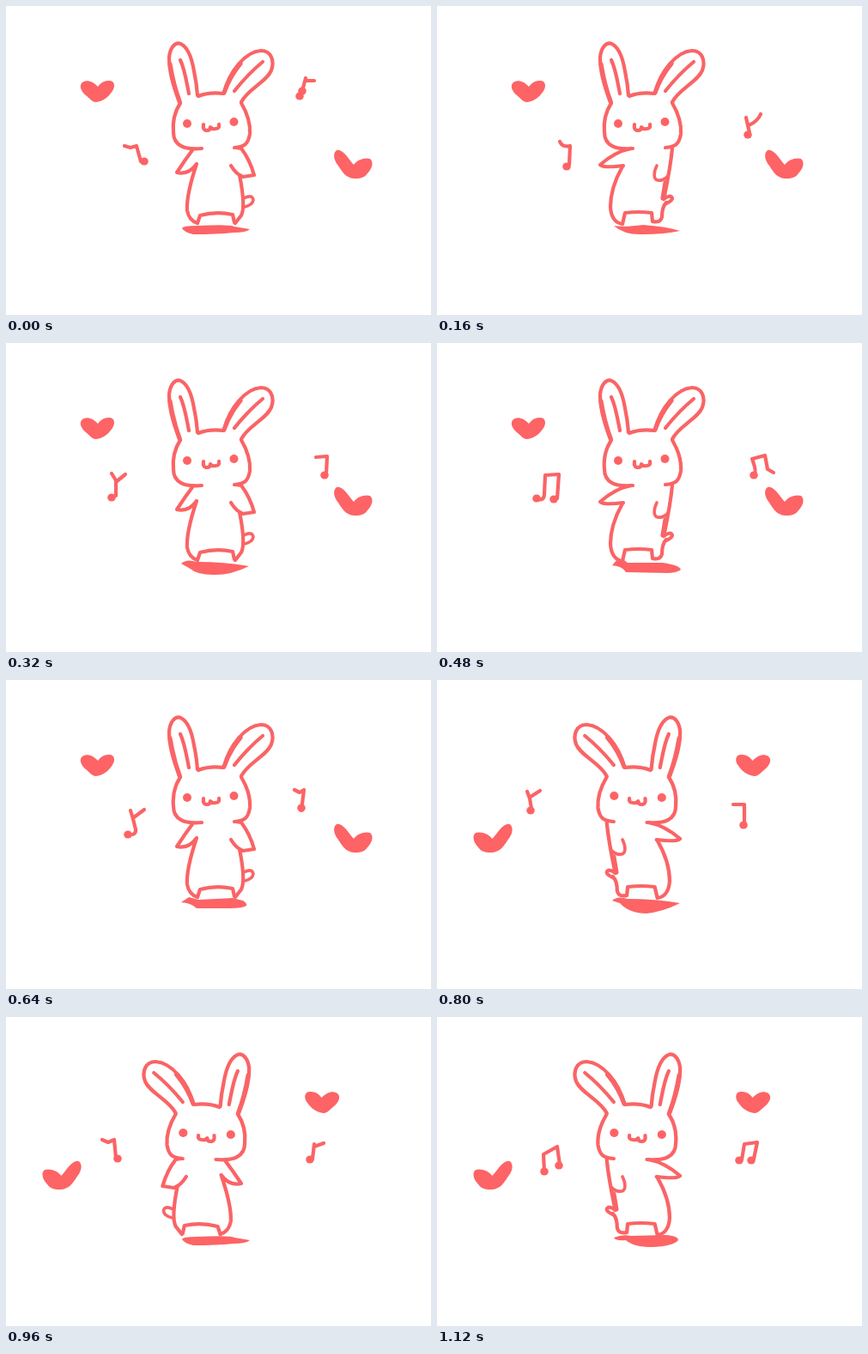
Write an HTML page that moves like this. It is 495x360 px and loops after 1.28 s.

```html
<!DOCTYPE html>
<html lang="en">
<head>
<meta charset="utf-8">
<title>Dancing rabbit</title>
<style>
  html, body { margin: 0; width: 100%; height: 100%; overflow: hidden; background: #fff; }
  svg { display: block; width: 495px; height: 360px; }
  .line { fill: none; stroke: #fa6466; stroke-width: 4.2; stroke-linecap: round; stroke-linejoin: round; }
  .thin { stroke-width: 3.6; }
  .bold { stroke-width: 5.2; }
  .fill { fill: #fe6365; stroke: none; }
</style>
</head>
<body>
<svg viewBox="0 0 495 360">
  <g id="dancer">
    <path class="fill" d="M104 112C99 111 97 107 93 104C88 100 85 94 88 90C92 85 101 87 107 94Q112 87 119 87C126 86 128 93 124 99C119 107 111 112 104 112Z"/>
    <path class="fill" d="M405 201C396 200 392 194 387 186C382 180 380 172 385 168C392 166 398 177 405 185C409 179 418 176 424 178C429 182 426 190 421 195C417 201 411 201 405 201Z"/>
    <g class="line">
      <path d="M203 113C196 97 190 77 190 60C191 49 196 43 202 43.500C210 46 216 58 219 76Q222 90 223 104"/>
      <path class="bold" d="M191 68Q195 92 202 111"/>
      <path d="M203 63C208 73 210 87 213 102"/>
      <path d="M224 105Q237 100 253 102"/>
      <path class="bold" d="M254 101Q260 83 273 67"/>
      <path d="M254 101C260 76 279 53 297 52C309 52 313 64 309 75C304 88 281 97 274 112"/>
      <path d="M299 65Q282 79 266 99"/>
      <path d="M203 113C196 124 194 137 195 147C195 162 207 168 228 166"/>
      <path d="M274 113C281 125 285 136 284 149C282 161 278 164 266 165"/>
      <path d="M230 138Q229 145 234 145Q238 145 238 141Q240 144 244 143Q249 143 248 138"/>
    </g>
    <circle class="fill" cx="211" cy="137" r="5"/>
    <circle class="fill" cx="265.500" cy="135" r="5"/>
    <g id="stand" class="line">
      <path d="M217 168Q208 180 199 194Q213 197 222 184C216 202 210 223 211 238Q213 250 223 253"/>
      <path d="M223 253L226 244Q245 239 264 243L266 252"/>
      <path d="M268 165L274 166Q284 179 289 197L276 199Q268 196 262 186"/>
      <path d="M272 197C275 212 279 234 274 244L267 253"/>
      <path class="thin" d="M277 224Q287 219 288 226Q287 232 278 234"/>
    </g>
    <g id="sway" class="line">
      <path d="M226 166C211 169 199 177 190 185Q194 189 217 186"/>
      <path d="M216 187C207 203 202 219 202 234Q203 252 216 254L219 241Q235 239 250 241L251 251Q260 253 262 246Q262 234 267 229"/>
      <path d="M274 166Q272 187 265 221"/>
      <path class="bold" d="M266 206L263 224"/>
      <path d="M264 225Q272 219 274 224Q274 227 267 230"/>
      <path class="thin" d="M256 186C252 194 252 202 257 203Q264 204 269 198"/>
    </g>
  </g>
  <path id="shadow" class="fill"/>
  <path id="notes" class="line"/>
  <g id="heads" class="fill"></g>
</svg>
<script>
const STEP = 160;
const $ = id => document.getElementById(id);
const MIRROR = "matrix(-1.0176 0 0 1 476.5 0)";

const shadowFlat = "M205 259Q206 256 222 256Q262 254 266 257L284 260Q280 264 265 264Q245 266 218 266Q208 264 205 259Z";
const shadowLow = "M204 257Q210 251 222 255Q255 255 283 260Q263 270 244 ";

// Each beat: shadow shape, note stems, note heads [x, y].
const beats = [
  { shadow: shadowFlat,
    notes: "M138 163L145 165L152 163L157 181M344 103L349 84M349 87L359 87",
    heads: [[161, 181], [345, 99], [342, 105]] },
  { shadow: "M206 256Q218 258 240 255Q268 257 283 262Q265 266 240 266Q218 267 206 256Z",
    notes: "M143 158Q146 165 155 163L154 185M360 130L364 148M363 139Q373 135 377 126",
    heads: [[151, 187], [362, 150]] },
  { shadow: shadowLow + "270Q224 271 213 262Z",
    notes: "M128 178L128 160L123 152M128 162L139 153M361 133L374 132L373 153",
    heads: [[123, 180], [371, 154]] },
  { shadow: "M204 259L210 252L218 253L222 256L263 256Q283 259 284 264Q279 268 268 268L220 267Q216 260 204 259Z",
    notes: "M117 182Q125 184 125 176L126 154L142 153L140 181M369 154Q373 151 367 135L382 131L385 147L392 151",
    heads: [[116, 181], [136, 182], [369, 154]] },
  { shadow: "M204 259L213 253L224 256L264 254L276 257Q281 260 280 263Q276 266 260 266L222 266Q216 260 204 259Z",
    notes: "M140 180Q152 182 151 174L148 162L145 152M149 160L161 151M336 128L342 131L347 128L344 152",
    heads: [[142, 180], [344, 149]] },
  { shadow: shadowLow + "272Q224 272 213 260Z",
    notes: "M110 150L108 138L105 130M109 136L120 129M345 145L358 145L358 168",
    heads: [[109, 152], [357, 169]] },
  { shadow: shadowFlat,
    notes: "M112 143L119 146L126 143L128 164M357 165L359 148M359 151L370 147",
    heads: [[130, 165], [354, 166]] },
  { shadow: "M206 257Q216 253 226 255L266 254Q281 255 281 260Q275 267 250 268Q229 268 220 260Q208 261 206 257Z",
    notes: "M125 180L124 160L140 151L143 172M355 166L358 148L373 146L369 165",
    heads: [[125, 180], [142, 173], [352, 167], [366, 167]] }
];

function draw(ms) {
  const i = Math.floor(ms / STEP) % beats.length;
  const beat = beats[i];
  const sways = i % 2 === 1;
  $("dancer").setAttribute("transform", i > 4 ? MIRROR : "");
  $("stand").style.display = sways ? "none" : "";
  $("sway").style.display = sways ? "" : "none";
  $("shadow").setAttribute("d", beat.shadow);
  $("notes").setAttribute("d", beat.notes);
  $("heads").innerHTML = beat.heads
    .map(([x, y]) => `<ellipse cx="${x}" cy="${y}" rx="4.800" ry="4.600"/>`).join("");
}

const start = performance.now();
let shown = -1;
function tick() {
  const ms = performance.now() - start;
  const beat = Math.floor(ms / STEP);
  if (beat !== shown) draw(ms);
  shown = beat;
  requestAnimationFrame(tick);
}
tick();
</script>
</body>
</html>
```
